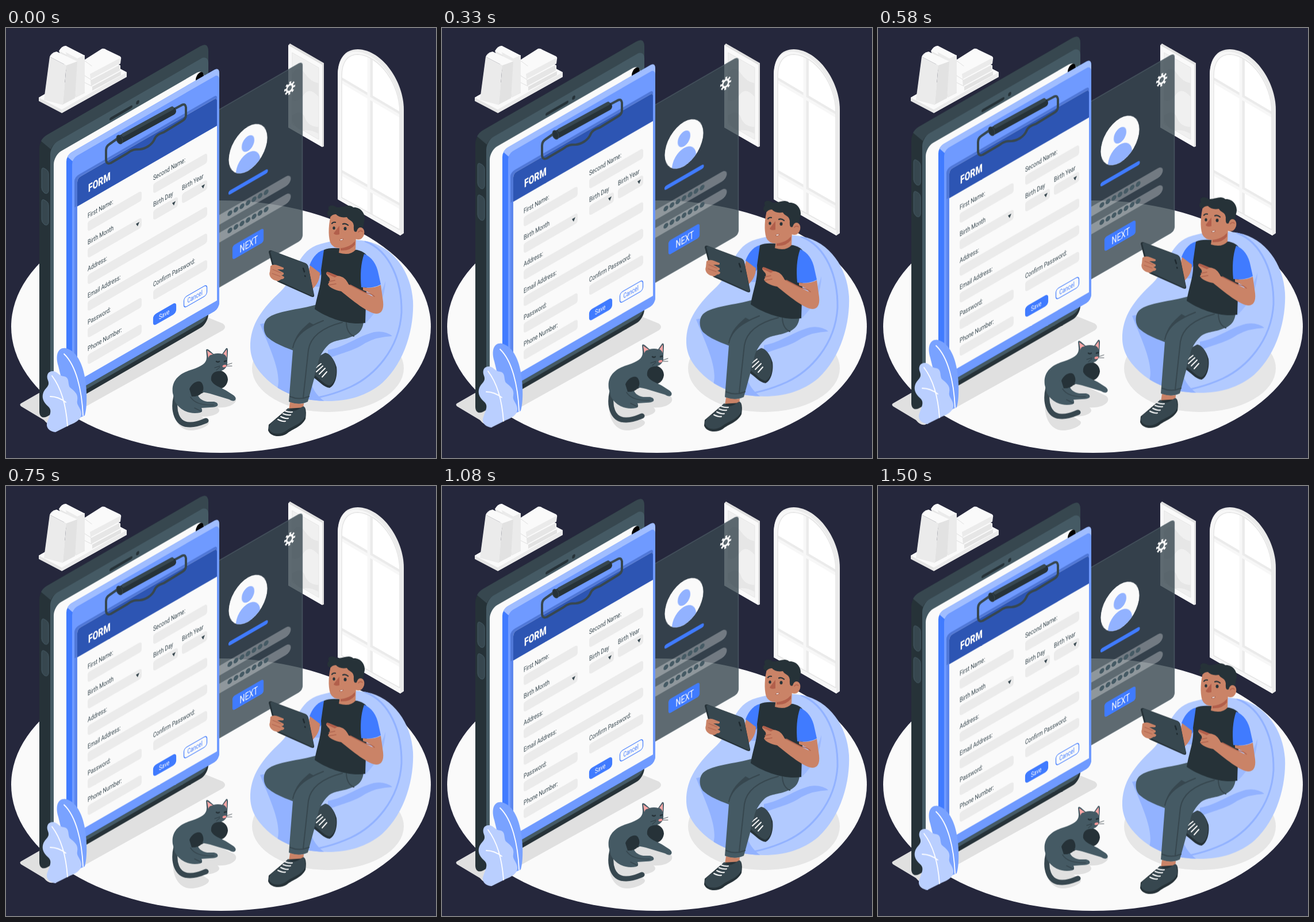
Recreate the animation shown at these times as an HTML page. Size 748 by 748 pixels, loop 1540 ms.

```html
<!DOCTYPE html>
<html lang="en">
<head>
<meta charset="utf-8">
<title>Form illustration</title>
<style>
  html, body { margin: 0; width: 100%; height: 100%; overflow: hidden; background: #25273c; }
  svg { display: block; width: 100vw; height: 100vh; }
  text { font-family: Roboto, "Open Sans", sans-serif; font-size: 12px; fill: #37474f; }
  .line { fill: none; stroke-linecap: round; stroke-linejoin: round; }
  .float { animation: float 1540ms infinite; }
  @keyframes float {
    0% { transform: translateY(0); animation-timing-function: linear; }
    38% { transform: translateY(-14.5px); animation-timing-function: cubic-bezier(.4, .3, .6, .7); }
    100% { transform: translateY(0); }
  }
</style>
</head>
<body>
<svg viewBox="0 0 748 748" xmlns="http://www.w3.org/2000/svg">
  <defs>
    <clipPath id="avatar"><ellipse cx="421" cy="453" rx="33.5" ry="38.5"/></clipPath>
    <clipPath id="glass"><path d="M584 295V84C584 58 595 46 612 46C650 48 685 98 685 146V351Z"/></clipPath>
    <clipPath id="bag"><path id="bagShape" d="M425 556C424 515 447 487 478 458C502 435 505 392 540 378C575 366 605 367 627 371C674 380 705 425 708 475C710 520 695 580 655 617C628 640 595 649 560 649C520 649 485 638 458 615C438 597 426 580 425 556Z"/></clipPath>
  </defs>

  <!-- room -->
  <ellipse cx="374" cy="519.5" rx="365" ry="219.5" fill="#fafafa"/>

  <g id="shelf">
    <path d="M57 121L170 56L210 77V85L97 148L57 127Z" fill="#e6e6e6"/>
    <path d="M57 121L170 56L210 77L97 142Z" fill="#fafafa"/>
    <path d="M97 142L210 77V85L97 148Z" fill="#ebebeb"/>
    <path d="M92 40L104 31L137 48V113L121 121L100 60Z" fill="#e6e6e6"/>
    <path d="M92 40Q97 31 104 31L137 48L124 56Z" fill="#fafafa"/>
    <path d="M104 42L124 53L137 47V112L122 120Z" fill="#ebebeb"/>
    <path d="M76 50L105 65L99 134L66 125Z" fill="#ebebeb"/>
    <path d="M105 65L124 58L120 122L99 133Z" fill="#e2e2e2"/>
    <path d="M76 50Q79 43 88 41L124 58L105 65Z" fill="#fafafa"/>
    <path d="M137 86L171 63L200 76V83L150 109L137 101Z" fill="#fafafa"/>
    <path d="M150 102L200 75V82L150 109Z" fill="#e2e2e2"/>
    <path d="M137 72L171 51L199 65V74L148 101L137 94Z" fill="#fafafa"/>
    <path d="M147 91L198 64V74L148 101Z" fill="#e6e6e6"/>
    <path d="M137 55L167 36Q171 35 175 38L198 49Q201 51 200 54L199 62L148 90L137 83Z" fill="#fafafa"/>
    <path d="M146 80L199 52V61L147 89Z" fill="#ebebeb"/>
    <path class="line" d="M137 57L149 66M137 83L148 90M137 95L149 101" stroke="#e0e0e0"/>
  </g>

  <g id="picture">
    <path d="M491 30L494 27L553 61V206L550 207L491 173Z" fill="#e0e0e0"/>
    <path d="M491 30L550 64V207L491 173Z" fill="#fafafa"/>
    <path d="M498 43L544 69V194L498 167Z" fill="#f0f0f0"/>
    <path d="M498 80Q508 62 519 78T544 96V120Q528 101 518 116T498 126ZM498 152Q514 140 520 156T544 172V184Q528 176 518 178T498 162Z" fill="#e6e6e6"/>
    <path class="line" d="M498 43L544 69V194L498 167Z" stroke="#e6e6e6"/>
  </g>

  <g id="window">
    <path d="M577 298V82C577 53 590 37 612 37C655 38 692 94 692 142V357L686 361Z" fill="#ebebeb"/>
    <path d="M577 298V84C577 56 588 41 608 41C650 43 686 96 686 146V361Z" fill="#f7f7f7"/>
    <path d="M584 295V84C584 58 595 46 612 46C650 48 685 98 685 146V351Z" fill="#fff"/>
    <g class="line" clip-path="url(#glass)" stroke-width="8" stroke="#ebebeb">
      <path d="M634 40V340M580 88L690 153M580 249L690 312"/>
      <path d="M631 40V340M580 91L690 156M580 252L690 315" stroke="#f7f7f7" stroke-width="5"/>
    </g>
    <path class="line" d="M584 295V84C584 58 595 46 612 46C650 48 685 98 685 146V351Z" stroke="#e6e6e6" stroke-width="1.6"/>
  </g>

  <g id="shadows" fill="#e0e0e0">
    <path d="M26 653L345 470V501L377 514Q385 520 377 526L82 690Q74 692 66 682L26 658Q23 655 26 653Z"/>
    <ellipse cx="560" cy="592" rx="132" ry="76" fill="#e6e6e6"/>
    <path d="M292 640C286 670 296 702 325 700C342 698 357 690 352 684L340 676C365 676 377 668 368 660C390 662 408 650 397 640L350 618Z"/>
  </g>

  <g class="float">
    <!-- profile panel -->
    <g transform="skewY(-30)">
      <rect x="330" y="355.5" width="186" height="310" rx="7" fill="#37474f" fill-opacity=".8"/>
      <path class="line" d="M340 356H509Q515.500 356 515.500 363V658Q515.500 665 509 665H340" stroke="#607078" stroke-opacity=".7"/>
      <g transform="translate(493.500 389.500) scale(.866 1)" fill="none" stroke="#fafafa">
        <circle r="6" stroke-width="3.400"/>
        <circle r="9" stroke-width="4" stroke-dasharray="3.535" stroke-dashoffset="1"/>
      </g>
      <ellipse cx="421" cy="453" rx="33.500" ry="38.500" fill="#fafafa"/>
      <g clip-path="url(#avatar)" fill="#92b2ff">
        <ellipse cx="421" cy="444" rx="11" ry="13"/>
        <ellipse cx="421" cy="484" rx="21" ry="24"/>
      </g>
      <path class="line" d="M390.500 511H452" stroke="#407bff" stroke-width="7"/>
      <path class="line" d="M350 548H487M350 579H487" stroke="#fff" stroke-opacity=".3" stroke-width="17"/>
      <path class="line" d="M389.500 547H454M389.500 577H454" stroke="#455a64" stroke-width="8.500" stroke-dasharray="0 10.500"/>
      <rect x="394" y="606.500" width="54" height="24.500" rx="4" fill="#407bff"/>
      <text transform="translate(406.500 625.500) scale(.72 1)" style="font-size:17.500px;fill:#fafafa">NEXT</text>
    </g>

    <!-- phone -->
    <g transform="skewY(-30)">
      <rect x="58" y="227" width="294" height="490" rx="14" ry="16" fill="#263238"/>
      <path d="M61 232Q64 227 72 227H338Q352 227 352 244V262L340 249H92Q81 249 78 256Z" fill="#37474f"/>
      <rect x="77" y="249" width="275" height="460" rx="13" ry="15" fill="#455a64"/>
      <rect x="83" y="269.500" width="262" height="425" rx="13" ry="16" fill="#fafafa"/>
      <ellipse cx="337" cy="281" rx="7" ry="9" fill="#000"/>
      <path class="line" d="M182.500 263H217.500" stroke="#263238" stroke-width="5"/>
      <ellipse cx="229" cy="261.500" rx="2.800" ry="3.300" fill="#263238"/>
    </g>
    <g fill="#37474f" stroke="#455a64" stroke-width="1">
      <path d="M62 248Q62 241 68 245Q74 248 74 254V283Q73 290 67 287Q62 283 62 278Z"/>
      <path d="M62 303Q62 296 68 300Q74 303 74 309V338Q73 345 67 342Q62 338 62 333Z"/>
    </g>

    <!-- clipboard -->
    <g transform="skewY(-30)">
      <rect x="105" y="282" width="266" height="420" rx="9" ry="11" fill="#407bff"/>
      <path d="M107 286Q109 282 115 282H362Q371 282 371 293V303L360 294H125Q119 294 116 299Z" fill="#a0bdff"/>
      <rect x="115" y="293.500" width="256" height="408.500" rx="8" ry="10" fill="#6f9aff"/>
      <path d="M119 382V336Q119 328 127 328H362Q367 328 367 333V382Z" fill="#5078d8"/>
      <path d="M119 381H125V684L119 678Z" fill="#5c87ee"/>
      <path d="M124 340Q124 333 130 333H362Q367 333 367 338V686H129Q124 686 124 681Z" fill="#fafafa"/>
      <path d="M124 382V340Q124 333 130 333H362Q367 333 367 338V382Z" fill="#2d55b3"/>
      <text transform="translate(143 368.500) scale(.72 1)" style="font-size:19.500px;font-weight:800;fill:#fafafa">FORM</text>
      <g id="fields"></g>
    </g>
    <g class="line">
      <path d="M200 188L180 202Q174 206 174 213V228Q174 238 182 235L211 218C220 211 225 211 233 211C243 210 254 203 258 194C261 186 267 184 275 181L306 162Q313 158 313 152V138Q312 130 304 135L289 143" stroke="#37474f" stroke-width="4"/>
      <path d="M199 194L289 144.500" stroke="#263238" stroke-width="14"/>
      <path d="M204 186L289 139.500" stroke="#37474f" stroke-width="6"/>
    </g>
    <ellipse cx="197.500" cy="194" rx="5" ry="8" transform="rotate(-20 197.500 194)" fill="#263238" stroke="#37474f"/>

    <!-- plant -->
    <path d="M128 678C111 662 100 626 91 588C85 568 91 555 104 557C125 562 136 590 139 620C142 650 139 668 137 674Z" fill="#79a2ff"/>
    <path class="line" d="M101 567C122 587 132 630 134 674" stroke="#fff" stroke-width="1.800"/>
    <path d="M86 703C77 702 70 697 71 688C75 674 82 666 73 658C64 650 62 642 65 634C69 625 77 623 73 613C69 603 74 596 83 597C91 599 92 605 101 606C111 608 107 618 111 625C119 632 126 636 124 648C122 656 130 660 131 670C132 681 120 687 112 690Z" fill="#bacfff"/>
    <path class="line" d="M80 605C99 630 105 663 107 692M77 641Q91 641 104 651" stroke="#fff" stroke-width="1.800"/>

    <!-- cat -->
    <g id="cat">
      <path class="line" d="M296 640C290 665 296 691 321 690C334 690 340 686 348 683" stroke="#37474f" stroke-width="9"/>
      <path d="M350 598C366 590 386 596 386 612C384 627 370 632 358 625L340 636L334 616Z" fill="#263238"/>
      <path d="M290 635C287 612 303 600 324 594C341 588 350 583 349 571L348 560Q349 557 353 560L361 567Q369 565 376 567L383 557Q386 556 386 561L385 580C386 589 380 597 369 597C359 598 356 605 357 613C361 622 373 625 382 630L396 639Q402 644 398 648Q394 650 388 646L355 636C347 634 340 632 334 634C332 642 340 648 350 650L362 650Q370 652 368 657Q365 660 355 660L340 661Q343 667 338 669C318 673 302 664 294 650Z" fill="#455a64"/>
      <path d="M319 628C324 615 339 610 342 620C347 632 338 642 323 641Z" fill="#263238"/>
      <path class="line" d="M321 642C328 653 341 656 361 656M328 661L340 667" stroke="#37474f" stroke-width="1.500"/>
      <path d="M350 561L360 568Q353 568 352 574ZM384 559L378 567Q383 569 384 574Z" fill="#ffa8a7"/>
      <ellipse cx="380" cy="588" rx="3.500" ry="2" transform="rotate(-18 380 588)" fill="#ff9a9a"/>
      <path class="line" d="M366 580Q369 582 371 580M380 580L383 579" stroke="#263238" stroke-width="2.400"/>
      <path class="line" d="M384 586L393 583M384 588L393 588M372 588L363 591M372 590L366 595" stroke="#263238" stroke-width=".8"/>
    </g>

    <!-- beanbag -->
    <use href="#bagShape" fill="#b2caff"/>
    <g clip-path="url(#bag)">
      <path d="M442 515C460 560 480 600 472 628L500 650L555 650C518 625 520 570 540 552L580 520L520 500Z" fill="#92b2ff"/>
      <path d="M625 371C668 388 689 440 688 495C684 560 640 605 600 624C565 640 535 645 515 647" class="line" stroke="#92b2ff" stroke-width="3"/>
      <path d="M560 560C590 555 612 536 640 529Q660 526 672 536Q645 537 625 548C604 562 590 563 560 575ZM525 450C522 432 530 425 548 420L550 450Z" fill="#92b2ff"/>
      <path d="M625 490Q650 475 660 440Q660 480 624 515Z" fill="#9dbaff"/>
    </g>

    <!-- far shoe and leg -->
    <g id="farFoot">
      <path d="M538 576L555 566C563 566 571 576 575 590C577 606 572 622 563 626C552 625 545 614 533 607Z" fill="#263238"/>
      <path d="M539 574L555 565C565 566 573 580 574 595C575 610 569 620 562 622C552 619 545 609 536 604Z" fill="#37474f"/>
      <path class="line" d="M539 591L548 584M540 598L551 588M545 602L555 592M550 607L558 598" stroke="#fafafa" stroke-width="2"/>
    </g>
    <path d="M541 481C510 490 470 492 455 505C446 513 447 530 455 538C472 553 496 558 520 570L541 590L548 562L570 530L590 495Z" fill="#455a64"/>
    <path d="M528 512C514 524 502 535 499 556L516 562L560 530Z" fill="#37474f"/>
    <path d="M541 481L622 508C622 521 616 533 601 537C585 544 570 542 560 552C545 567 540 585 536 610L525 650Q508 658 492 650L499 560C502 535 525 520 550 511Z" fill="#455a64"/>
    <path class="line" d="M499 556C503 533 524 520 552 509M494 641Q510 648 527 641M592 513Q593 531 605 536M585 512C554 520 530 535 526 560L517 643" stroke="#37474f" stroke-width="2"/>

    <!-- near shoe -->
    <path d="M494 651Q507 655 518 653L516 672L491 671Z" fill="#ca8367"/>
    <path d="M456 700L457 690L490 662L520 660Q523 667 521 680C514 694 499 697 488 706C477 713 460 711 456 700Z" fill="#263238"/>
    <path d="M457 696C459 684 472 682 482 670L491 661Q499 672 515 659Q520 656 520 664L521 675C514 690 498 692 487 701C477 708 461 708 457 696Z" fill="#37474f"/>
    <path class="line" d="M485 666Q493 669 498 668M482 671Q490 674 495 673M478 676Q486 680 491 679M473 681Q481 685 486 684" stroke="#fafafa" stroke-width="2"/>

    <!-- torso -->
    <path d="M553 386C539 390 532 402 528 413L546 431L556 420Z" fill="#407bff"/>
    <path d="M529 413L546 426C546 438 541 447 532 455L524 433Z" fill="#ca8367"/>
    <path d="M553 386Q562 382 577 383L611 386Q628 390 630 402L626 480L625 513C598 518 560 505 537 489C542 460 550 445 548 421Z" fill="#263238"/>
    <path d="M623 393C636 398 645 411 648 428L652 446Q637 454 618 451C616 430 617 410 623 393Z" fill="#407bff"/>
    <path d="M621 451Q638 454 652 447L656 476Q658 496 645 497C630 497 602 473 583 458C573 456 563 452 560 446C564 440 565 436 560 432L557 428Q557 423 562 425L576 431C588 432 592 438 596 446L638 467Q635 460 621 456Z" fill="#ca8367"/>
    <path class="line" d="M599 447L624 460Q636 462 641 467M562 441L572 439M562 447L574 445" stroke="#b06550" stroke-width="1.600"/>
    <path d="M557 427Q557 423 562 425L577 431L572 434Z" fill="#b25f4b"/>

    <!-- tablet -->
    <path d="M457 390Q457 386 462 387L521 409Q525 411 526 416L536 464Q537 470 530 467L474 442Q470 440 469 436Z" fill="#263238"/>
    <path d="M460 390Q460 387 464 388L522 410Q525 412 526 416L535 462Q536 468 530 465L476 440Q472 438 471 434Z" fill="#37474f"/>
    <path class="line" d="M517 418L519 424M520 431L520.500 432" stroke="#1f2a30" stroke-width="2.500"/>
    <path d="M460 414Q465 410 473 413L483 417Q484 421 478 420L472 420L483 426Q484 430 479 430L484 433Q484 437 479 437L474 440C463 440 456 431 459 424Z" fill="#ca8367"/>
    <path class="line" d="M464 420L478 426M463 427L477 432" stroke="#b06550" stroke-width="1.200"/>

    <!-- head -->
    <path d="M582 372L609 360L608 386Q598 397 579 391Z" fill="#ca8367"/>
    <path d="M582 382Q598 382 607 371L607 377Q599 388 582 387Z" fill="#b25f4b"/>
    <path d="M566 322C561 340 560 360 564 373Q568 383 582 383C596 382 605 374 608 367Q619 371 623 359Q625 347 614 346L608 350L606 324L580 318Z" fill="#ca8367"/>
    <path d="M565 328C558 328 557 320 562 317C557 309 568 306 575 312C586 313 596 305 604 312C619 311 627 326 623 337L621 348Q613 344 610 354Q604 357 605 344C604 334 597 336 593 329Q580 331 574 324Q568 324 565 328Z" fill="#263238"/>
    <path d="M580 344L570 357Q572 361 580 359Z" fill="#b25f4b"/>
    <g fill="#263238">
      <ellipse cx="570.500" cy="348" rx="2.200" ry="2.800"/>
      <ellipse cx="590" cy="349" rx="2.500" ry="3"/>
    </g>
    <path class="line" d="M567 340Q569 337 573 338M586 341Q590 339 595 343" stroke="#263238" stroke-width="2.200"/>
    <path d="M580 369Q582 366 587 367Q585 371 580 369Z" fill="#fafafa" stroke="#9a4f3e" stroke-width=".8"/>
    <path class="line" d="M613 355Q616 351 620 354" stroke="#b25f4b" stroke-width="1.400"/>
  </g>
</svg>
<script>
  const ROW = 46.3, BASE = 413;

  const label = (x, y, s, fill = '#37474f') =>
    `<text transform="translate(${x} ${y}) scale(.72 1)" style="fill:${fill}">${s}</text>`;

  const field = (name, row, x, w, menu) => {
    const y = BASE + row * ROW, m = y + 15, a = x + w - 7;
    return label(x, y, name) +
      `<rect x="${x}" y="${y + 6}" width="${w}" height="17.500" rx="4.500" fill="#ebebeb"/>` +
      (menu ? `<path d="M${a - 3} ${m - 3}h6l-3 6z" fill="#37474f"/>` : '');
  };

  const button = (name, x, w, tx, fill, ink) =>
    `<rect x="${x}" y="648" width="${w}" height="18" rx="5" fill="${fill}" stroke="#407bff" stroke-width="1.200"/>` +
    label(tx, 661, name, ink);

  document.getElementById('fields').innerHTML = [
    field('First Name:', 0, 142, 94),
    field('Second Name:', 0, 256, 94),
    field('Birth Month', 1, 142, 94, true),
    field('Birth Day', 1, 256, 43, true),
    field('Birth Year', 1, 306, 44, true),
    field('Address:', 2, 142, 208),
    field('Email Address:', 3, 142, 208),
    field('Password:', 4, 142, 94),
    field('Confirm Password:', 4, 256, 94),
    field('Phone Number:', 5, 142, 94),
    button('Save', 256.500, 39, 266, '#407bff', '#fafafa'),
    button('Cancel', 309.500, 40, 315.500, '#fafafa', '#407bff')
  ].join('');
</script>
</body>
</html>
```
